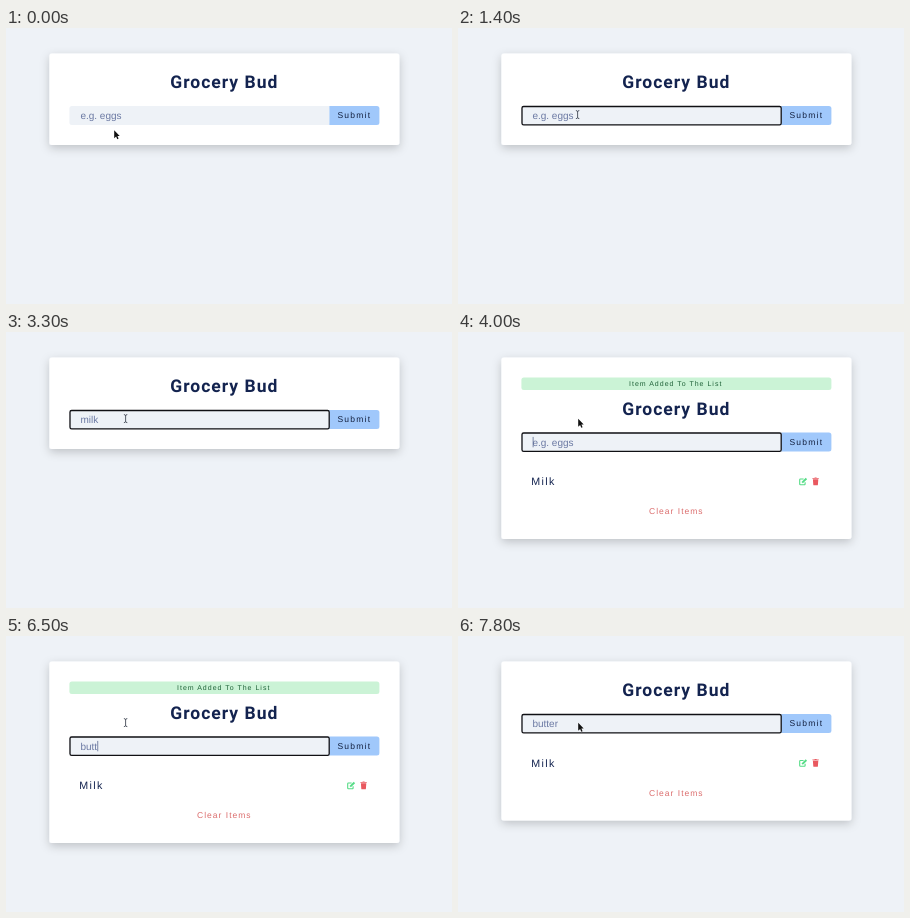
An HTML page that plays this animation: 446x276 px, repeating every 8000 ms.

```html
<!DOCTYPE html>
<html lang="en">
<head>
<meta charset="utf-8">
<title>Grocery list</title>
<style>
  html, body { margin: 0; width: 100%; height: 100%; overflow: hidden; background: #eef2f7; }
  svg { display: block; width: 446px; height: 276px; }
  text { font-family: "Liberation Sans", Arial, sans-serif; text-rendering: geometricPrecision; white-space: pre; }
  .title { font: 700 17.5px Roboto, sans-serif; letter-spacing: 1px; fill: #13234f; }
  .field { font-size: 10px; fill: #6b79a3; }
  .submit { font-size: 8.5px; letter-spacing: 1.25px; fill: #13203f; }
  .alert { font-size: 7px; letter-spacing: 1px; fill: #1f6238; }
  .item { font-size: 10.7px; letter-spacing: 1.35px; fill: #13234f; }
  .clear { font-size: 8.5px; letter-spacing: 1px; fill: #db6c6c; }
</style>
</head>
<body>
<svg viewBox="0 0 446 276">
  <defs>
    <filter id="shadow" x="-10%" y="-30%" width="120%" height="160%">
      <feDropShadow dx="0" dy="3.1" stdDeviation="4.7" flood-color="#000" flood-opacity=".2"/>
    </filter>
  </defs>
  <rect width="446" height="276" fill="#eef2f7"/>
  <rect id="card" x="43.4" y="25.5" width="350" height="91.5" rx="2.5" fill="#fff" filter="url(#shadow)"/>

  <g id="alert">
    <rect x="63.4" y="45.5" width="310" height="12.5" rx="2.5" fill="#cbf3d6"/>
    <text class="alert" x="171" y="54.3">Item Added To The List</text>
  </g>

  <g id="body">
    <text class="title" x="164.3" y="60.2">Grocery Bud</text>
    <path d="M323.4 78H65.9a2.5 2.5 0 0 0-2.5 2.5v14a2.5 2.5 0 0 0 2.5 2.5H323.4z" fill="#eef2f7"/>
    <path d="M323.4 78H370.9a2.5 2.5 0 0 1 2.5 2.5v14a2.5 2.5 0 0 1-2.5 2.5H323.4z" fill="#a0c8fb"/>
    <text class="submit" x="331.4" y="90.2">Submit</text>
    <rect id="focus" x="64" y="78.5" width="259.2" height="18.3" rx="1.6" fill="none" stroke="#101014" stroke-width="1.3"/>
    <text id="field" class="field" x="74.4" y="91"></text>
    <rect id="caret" y="82.4" width=".8" height="10.4" fill="#5c6a92"/>

    <g id="list">
      <text class="item" x="73.2" y="130.8">Milk</text>
      <g fill="none" stroke="#55dc86">
        <path d="M345.6 124.5H342.4a.7.7 0 0 0-.7.7V129.6a.7.7 0 0 0 .7.7H346.4a.7.7 0 0 0 .7-.7V127.7" stroke-width="1.1"/>
        <path d="M344.2 128.2L348.4 124" stroke-width="1.9"/>
      </g>
      <path d="M354.4 124.2V123.5H356.4L356.8 123H358.4L358.8 123.5H360.8V124.2zM354.9 124.8H360.3L359.9 130.2a.6.6 0 0 1-.6.6H355.9a.6.6 0 0 1-.6-.6z" fill="#e9585f"/>
      <text class="clear" x="191.1" y="159.6">Clear Items</text>
    </g>
  </g>

  <path id="arrow" d="M0 0V8L1.9 6.3 3.1 9 4.4 8.4 3.2 5.8H5.5z" fill="#111" stroke="#fff" stroke-width=".6" paint-order="stroke"/>
  <path id="beam" d="M117.9 82.6Q119.6 82.6 119.6 83.8 119.6 82.6 121.3 82.6M119.6 83.6V89.6M117.9 90.6Q119.6 90.6 119.6 89.4 119.6 90.6 121.3 90.6" fill="none" stroke="#454b57" stroke-width=".9"/>
</svg>
<script>
const LOOP = 8000;
const HINT = "e.g. eggs";
const START_X = 74.4;
const SHIFT = 22.5;
const $ = id => document.getElementById(id);

// [time, text, caret visible]
const typing = [
  [0, HINT, false], [900, HINT, true], [1400, HINT, false],
  [2100, "m", true], [2400, "mil", true], [2700, "milk", true], [3300, "milk", false],
  [4000, HINT, true], [4700, HINT, false], [5300, HINT, true],
  [5900, "b", true], [6000, "bu", true], [6200, "but", true], [6400, "butt", true],
  [6700, "butte", true], [6900, "butter", true], [7800, "butter", false]
];

// [time, arrow tip x, y]; without a position the text pointer shows
const pointer = [
  [0, 108.2, 102.2], [100, 109, 96], [200, 110, 91], [600],
  [4000, 120.2, 86.8], [6500], [7800, 120.2, 86.8]
];

const at = (steps, t) => steps.findLast(step => step[0] <= t);
const show = (id, on) => $(id).setAttribute("visibility", on ? "visible" : "hidden");

function draw(t) {
  const hasItem = t >= 4000;
  const alerting = hasItem && t < 6700;
  $("card").setAttribute("height", alerting ? 181.5 : hasItem ? 159 : 91.5);
  $("body").setAttribute("transform", `translate(0 ${alerting ? SHIFT : 0})`);
  show("alert", alerting);
  show("list", hasItem);
  show("focus", t >= 900);

  const [, text, caretOn] = at(typing, t);
  const field = $("field");
  if (field.textContent !== text) field.textContent = text;
  const width = text === HINT ? 0 : field.getComputedTextLength();
  $("caret").setAttribute("x", START_X + width + 0.3);
  show("caret", caretOn);

  const [, x, y] = at(pointer, t);
  const isArrow = x !== undefined;
  if (isArrow) $("arrow").setAttribute("transform", `translate(${x} ${y})`);
  show("arrow", isArrow);
  show("beam", !isArrow);
}

function tick() {
  draw(performance.now() % LOOP);
  requestAnimationFrame(tick);
}
tick();
</script>
</body>
</html>
```
